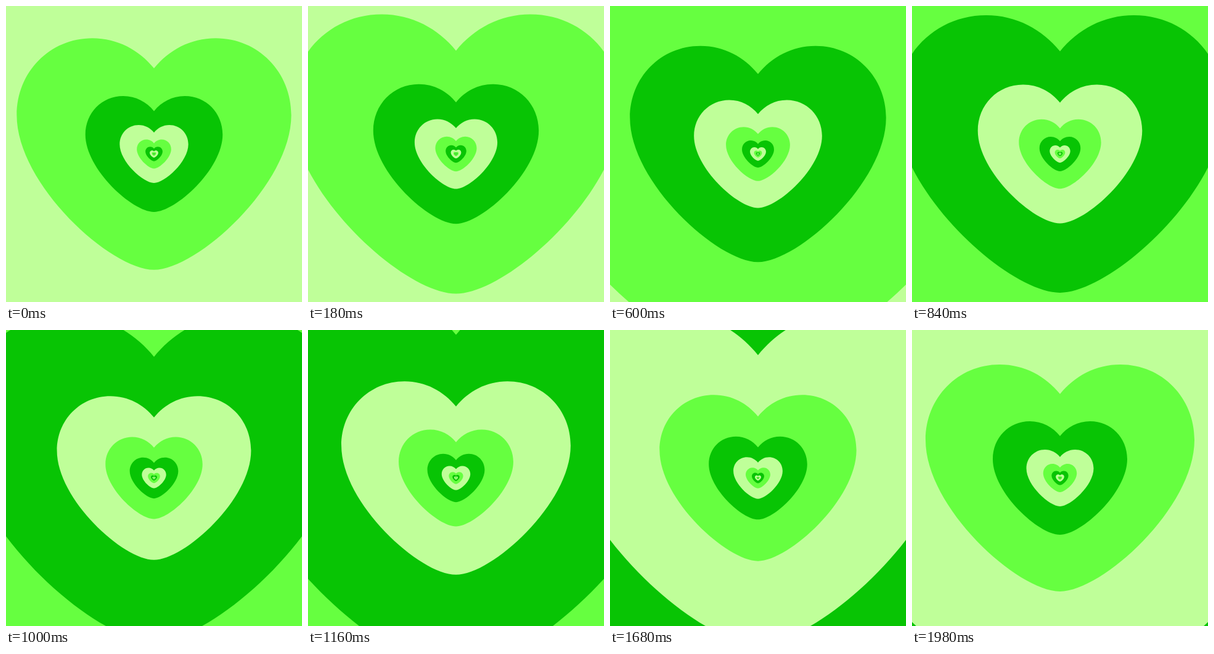
An HTML page for the animation above (2000 ms loop, 480 by 480 pixels).

```html
<!DOCTYPE html>
<html lang="en">
<head>
<meta charset="utf-8">
<title>Endless hearts</title>
<style>
  html, body { margin: 0; width: 100%; height: 100%; overflow: hidden; background: #bfff99; }
  svg { display: block; width: 100vw; height: 100vh; }
</style>
</head>
<body>
<svg viewBox="-240 -240 480 480">
  <defs>
    <path id="heart" d="M0 -139
      C24 -168.5 59 -187.8 100 -187.8
      C169 -187.8 222.6 -133 222.6 -63
      C222.6 49 70 187.8 0 187.8
      C-70 187.8 -222.6 49 -222.6 -63
      C-222.6 -133 -169 -187.8 -100 -187.8
      C-59 -187.8 -24 -168.5 0 -139Z"/>
  </defs>
  <g id="tunnel"></g>
</svg>
<script>
  const LOOP = 2000, STEP = 20, FIRST = -2, LAST = 11;
  const colors = ['#66ff40', '#08c404', '#bfff99'];
  const tunnel = document.getElementById('tunnel');

  // Each heart is half the size of the one around it.
  for (let n = FIRST; n <= LAST; n++) {
    const heart = document.createElementNS('http://www.w3.org/2000/svg', 'use');
    heart.setAttribute('href', '#heart');
    heart.setAttribute('fill', colors[(n + 3) % 3]);
    heart.setAttribute('transform', `scale(${2 ** -n})`);
    tunnel.append(heart);
  }

  // Three doublings bring the colours back to where they began.
  function draw(time) {
    const t = Math.floor((time % LOOP) / STEP) * STEP;
    tunnel.setAttribute('transform', `scale(${2 ** (3 * t / LOOP)})`);
  }

  const start = performance.now();
  function tick() {
    draw(performance.now() - start);
    requestAnimationFrame(tick);
  }
  tick();
</script>
</body>
</html>
```
